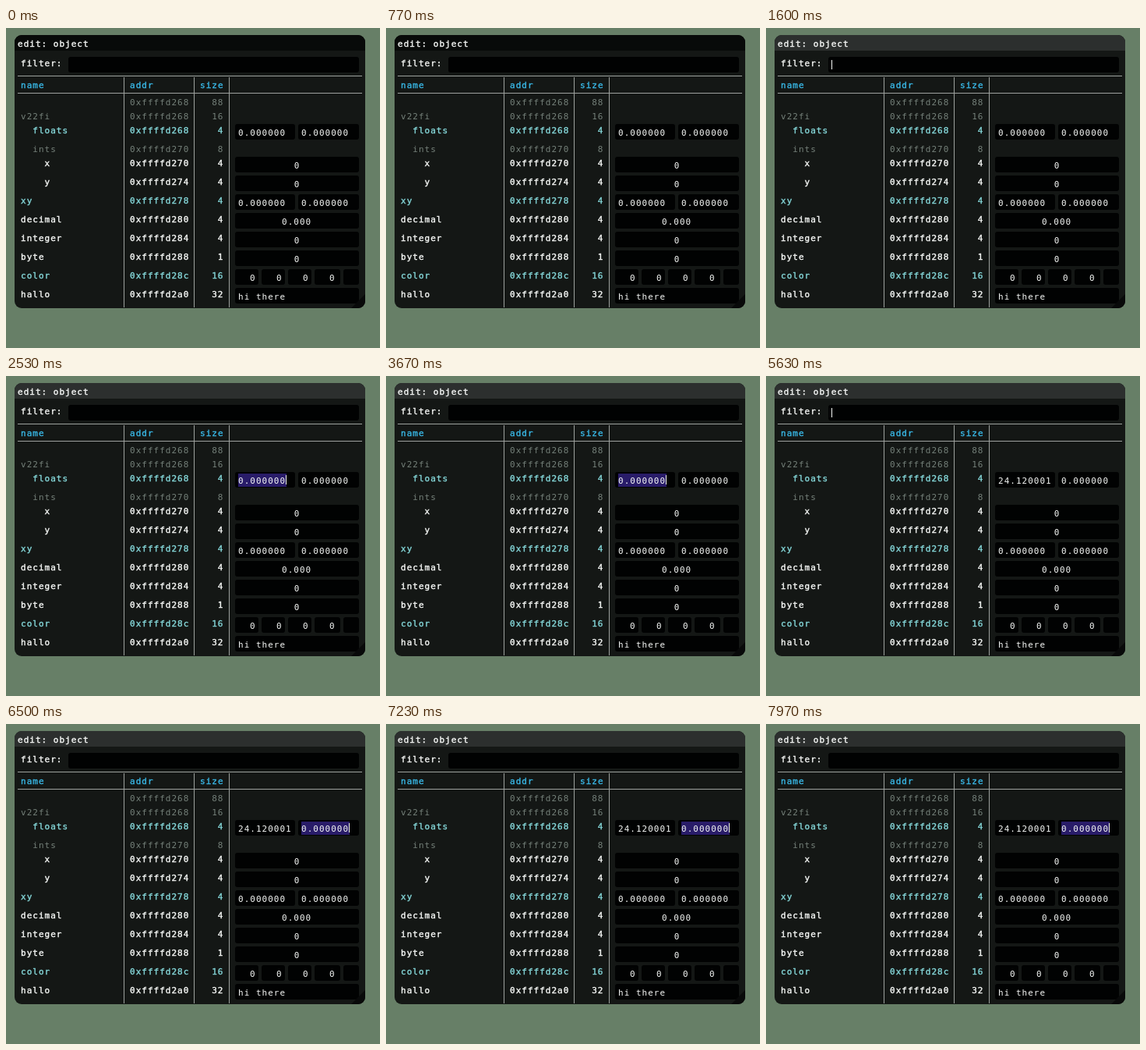
Recreate the animation shown at these times as an HTML page. Size 480 by 410 pixels, loop 8 s.

```html
<!DOCTYPE html>
<html lang="en">
<head>
<meta charset="utf-8">
<title>edit: object</title>
<style>
html, body { margin: 0; width: 100%; height: 100%; overflow: hidden; background: #677f67; }
svg { display: block; }
text {
  font: 11px "DejaVu Sans Mono", monospace;
  letter-spacing: 1.01px;
  white-space: pre;
}
.strong { stroke-width: 0.4px; }
</style>
</head>
<body>
<svg id="stage" width="480" height="410" viewBox="0 0 480 410"></svg>
<script>
const LOOP = 8000;
const CHAR = 7.63;
const WHITE = "#f6f8f6", TEAL = "#84d6d8", GRAY = "#75817a", BLUE = "#38b6e4";
const stage = document.getElementById("stage");

function add(tag, attrs) {
  const el = document.createElementNS("http://www.w3.org/2000/svg", tag);
  for (const key in attrs) el.setAttribute(key, attrs[key]);
  return stage.appendChild(el);
}

const rect = (x, y, width, height, fill, rx = 0) => add("rect", { x, y, width, height, fill, rx });
const field = (x, y, width) => rect(x, y, width, 20, "#010202", 3);

function value(str, x, y, fill = WHITE) {
  const el = add("text", { x, y, fill });
  el.textContent = str;
  return el;
}

function label(str, x, y, color = WHITE) {
  const el = value(str, x, y, color);
  el.setAttribute("stroke", color);
  el.setAttribute("class", "strong");
}

// Window, title bar and filter
rect(11, 9, 450, 350, "#141715", 9);
const title = add("path", { d: "M11 29V18a9 9 0 0 1 9-9H452a9 9 0 0 1 9 9V29Z" });
label("edit: object", 15, 24);
label("filter:", 19, 49);
field(80, 37, 373);

// Table grid and headings
for (const y of [61, 83]) rect(15, y, 442, 1, "#9da19e");
for (const x of [151, 241, 286]) rect(x, 63, 1, 295, "#9da19e");
label("name", 19, 77, BLUE);
label("addr", 159, 77, BLUE);
label("size", 249, 77, BLUE);

// indent, name, address ending, size, baseline, colour
const rows = [
  [0, "", "268", 88, 99, GRAY],
  [0, "v22fi", "268", 16, 117, GRAY],
  [2, "floats", "268", 4, 135, TEAL],
  [2, "ints", "270", 8, 159, GRAY],
  [4, "x", "270", 4, 177, WHITE],
  [4, "y", "274", 4, 201, WHITE],
  [0, "xy", "278", 4, 225, TEAL],
  [0, "decimal", "280", 4, 249, WHITE],
  [0, "integer", "284", 4, 273, WHITE],
  [0, "byte", "288", 1, 297, WHITE],
  [0, "color", "28c", 16, 321, TEAL],
  [0, "hallo", "2a0", 32, 345, WHITE]
];
for (const [indent, name, end, size, y, color] of rows) {
  const write = color === GRAY ? value : label;
  write(name, 19 + indent * CHAR, y, color);
  write("0xffffd" + end, 159, y, color);
  write(size, 279.5 - String(size).length * CHAR, y, color);
}

// Value fields
for (const y of [123, 213]) {
  field(294, y, 77);
  field(375, y, 78);
}
for (const y of [165, 189, 237, 261, 285, 333]) field(294, y, 159);
for (const y of [180, 204, 276, 300]) value("0", 369.7, y);
value("0.000", 354, 252);
value("0.000000", 298, 228);
value("0.000000", 379, 228);
for (let i = 0; i < 4; i++) {
  field(294 + i * 34, 309, i < 3 ? 30 : 33);
  value("0", 313 + i * 34, 324);
}
field(433, 309, 20);
value("hi there", 298, 348);
add("path", { d: "M461 341V350a9 9 0 0 1-9 9H443Z", fill: "#080909" });

// Parts that change
const selection = rect(298, 125, 62, 17, "#291c69");
const first = value("0.000000", 298, 138);
value("0.000000", 379, 138);
const caret = rect(0, 0, 1, 12, WHITE);

const ACTIVATE = 1100, SELECT = 2170, COMMIT = 5330, REFOCUS = 5630, NEXT = 6170;
const typed = "24.12";
const keys = [3770, 3970, 4230, 4430, 4700];

function show(el, x, y) {
  el.setAttribute("x", x);
  el.setAttribute("y", y);
  el.setAttribute("visibility", "visible");
}

function draw(t) {
  const count = keys.filter(k => t >= k).length;
  const editing = t >= SELECT && t < COMMIT;
  const inFilter = (t >= ACTIVATE && t < SELECT) || (t >= REFOCUS && t < NEXT);

  title.setAttribute("fill", t < ACTIVATE ? "#080a09" : "#2c2f2e");
  first.textContent = t >= COMMIT ? "24.120001" : count ? typed.slice(0, count) : "0.000000";

  selection.setAttribute("visibility", "hidden");
  if (editing && !count) show(selection, 298, 125);
  if (t >= NEXT) show(selection, 379, 125);

  caret.setAttribute("visibility", "hidden");
  if (inFilter) show(caret, 84, 41);
  if (editing) show(caret, Math.round(298 + (count || 8) * CHAR + 0.4), 127);
  if (t >= NEXT) show(caret, 440, 127);
}

const start = performance.now();
function tick() {
  draw((performance.now() - start) % LOOP);
  requestAnimationFrame(tick);
}
tick();
</script>
</body>
</html>
```
